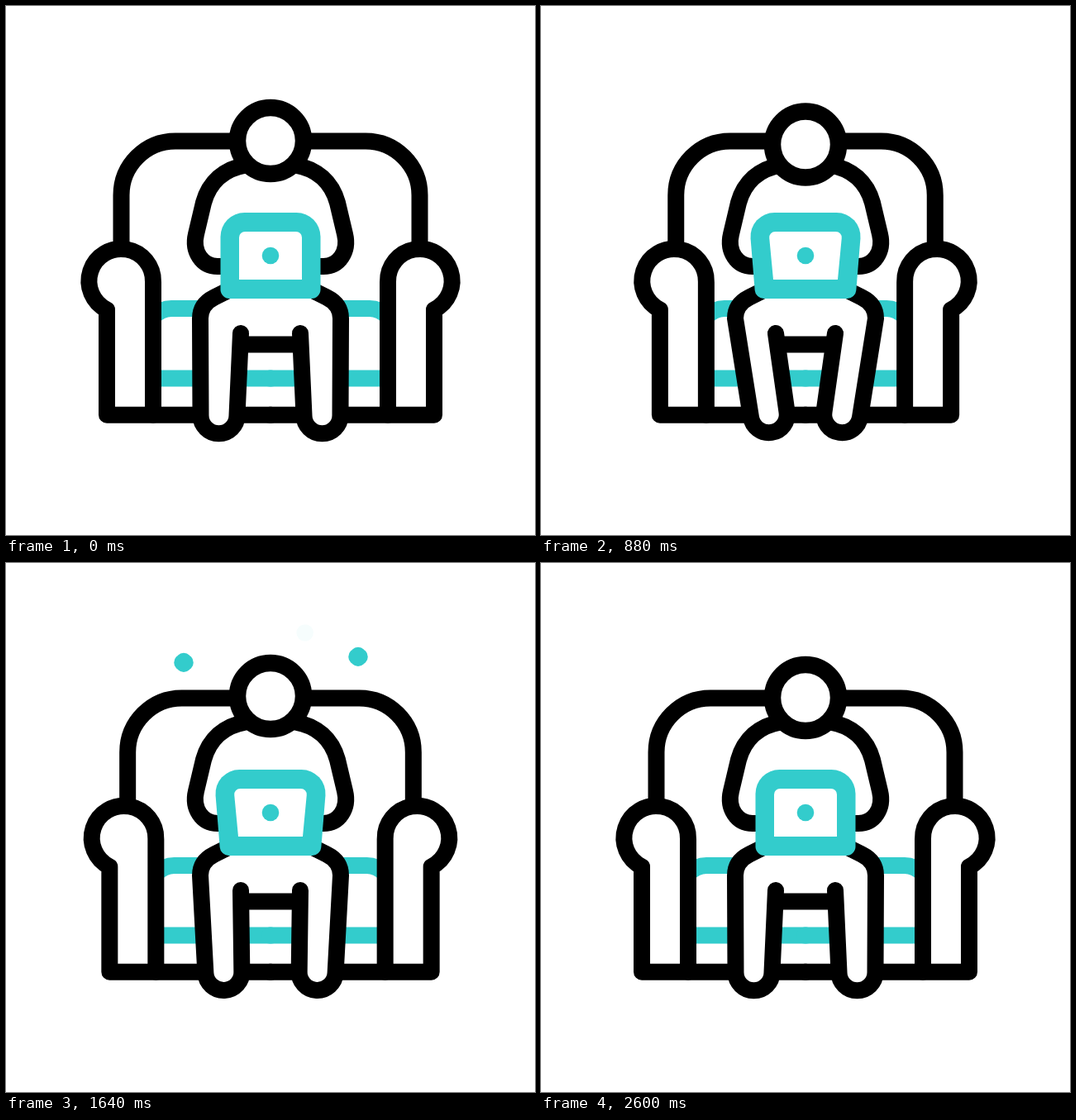
Recreate the animation shown at these times as an HTML page with a canvas. Size 640 px wide and 640 px high, loop 3000 ms.

```html
<!DOCTYPE html>
<html lang="en">
<head>
<meta charset="utf-8">
<title>Working on the sofa</title>
<style>
html, body { margin: 0; width: 100%; height: 100%; overflow: hidden; background: #fff; }
canvas { display: block; width: 100vmin; height: 100vmin; }
</style>
</head>
<body>
<canvas id="stage" width="640" height="640"></canvas>
<script>
const ctx = document.getElementById('stage').getContext('2d');
const BLACK = '#000', TEAL = '#33cccc', WHITE = '#fff';
const LOOP = 3000, STEP = 40, LAST = 2600;

// Eased 0 to 1 between two times.
function ramp(t, from, to) {
  const p = Math.min(1, Math.max(0, (t - from) / (to - from)));
  return p * p * (3 - 2 * p);
}

// Eased rise, hold and fall.
const pulse = (t, rise, top, fall, end) => ramp(t, rise, top) - ramp(t, fall, end);

function draw(d, { stroke, fill, width = 20 }) {
  const path = new Path2D(d);
  if (fill) { ctx.fillStyle = fill; ctx.fill(path); }
  if (stroke) { ctx.strokeStyle = stroke; ctx.lineWidth = width; ctx.stroke(path); }
}

function disc(x, y, r, color, alpha = 1) {
  ctx.globalAlpha = alpha;
  ctx.fillStyle = color;
  ctx.beginPath();
  ctx.arc(x, y, r, 0, Math.PI * 2);
  ctx.fill();
  ctx.globalAlpha = 1;
}

// Symmetric four-sided panel with rounded corners.
function panel(topX, topY, topR, bottomX, bottomY, bottomR, color) {
  ctx.beginPath();
  ctx.moveTo(320, topY);
  ctx.arcTo(640 - topX, topY, 640 - bottomX, bottomY, topR);
  ctx.arcTo(640 - bottomX, bottomY, bottomX, bottomY, bottomR);
  ctx.arcTo(bottomX, bottomY, topX, topY, bottomR);
  ctx.arcTo(topX, topY, 320, topY, topR);
  ctx.closePath();
  ctx.fillStyle = color;
  ctx.fill();
}

function bothSides(paint) {
  paint();
  ctx.save();
  ctx.translate(640, 0);
  ctx.scale(-1, 1);
  paint();
  ctx.restore();
}

function drawSofa(widen, squeeze) {
  const back = 139.5 - 6.5 * widen + 42.5 * squeeze;
  const arm = 122 - 13 * widen + 49 * squeeze;
  const inner = arm + 56;
  bothSides(() => {
    draw(`M${back} 300V229a65.5 65.5 0 0 1 65.5 -65.5H321`, { stroke: BLACK });
    draw(`M${inner} 376c6 -6 13 -10 22 -10H321M${inner} 450.5H321`, { stroke: TEAL });
    draw(`M${inner} 494.7H321`, { stroke: BLACK });
    draw(`M${arm} 367.5A38.8 38.8 0 1 1 ${inner} 334V494.7H${arm}Z`,
      { stroke: BLACK, fill: WHITE });
  });
}

function drawPerson(headY, shift) {
  const tilt = shift / 120, r = 22;
  const footX = 257.5 + shift, footY = 495.3 - shift * 0.06;
  const dx = r * Math.cos(tilt), dy = r * Math.sin(tilt);
  draw('M284 409.5H356', { stroke: BLACK });
  bothSides(() => {
    draw('M290 192.5C264 197 246 213 239 238L230 276C225 297 237 315 256 315H270',
      { stroke: BLACK });
    const leg = `M266 345.5L252 352.5Q235 361 235 378L${footX - dx} ${footY + dy}` +
      `A${r} ${r} 0 0 0 ${footX + dx} ${footY - dy}L284 396`;
    draw(leg + 'H321V345Z', { fill: WHITE });
    draw(leg, { stroke: BLACK });
  });
  draw(`M280 ${headY}a40 40 0 1 1 80 0a40 40 0 1 1 -80 0Z`,
    { stroke: BLACK, fill: WHITE, width: 20.5 });
}

function drawLaptop(open) {
  panel(259.5 - 8.5 * open, 250, 29, 259.5, 354, 11, TEAL);
  panel(282 - 6.5 * open, 273, 7, 282 - open, 331, 0, WHITE);
  disc(320, 302, 10.3, TEAL);
}

function drawSpark(x, base, wide, tall) {
  if (wide <= 0) return;
  const height = 51 * tall, half = 17 * wide, mid = base - height / 2;
  draw(`M${x} ${base}V${base - height - 0.01}M${x - half} ${mid}H${x + half}`, { stroke: TEAL });
}

function render(t) {
  const widen = pulse(t, 0, 480, 1880, 2600);
  const squeeze = pulse(t, 480, 1100, 1260, 1880);
  const lift = pulse(t, 0, 600, 1720, 2160);
  const nod = pulse(t, 600, 1090, 1090, 1720);
  const step = pulse(Math.max(0, t - 200) % 1200, 0, 640, 640, 1200);
  const wide = pulse(t, 960, 1230, 1480, 1680);
  const tall = pulse(t, 960, 1390, 1420, 1680);

  ctx.fillStyle = WHITE;
  ctx.fillRect(0, 0, 640, 640);
  ctx.lineCap = ctx.lineJoin = 'round';
  drawSofa(widen, squeeze);
  drawPerson(163 - 2.6 * lift + 11.6 * nod, 18.5 * step);
  drawLaptop(widen);
  drawSpark(215, 122, wide, tall);
  drawSpark(426, 115, wide, tall);
  disc(284.5, 64, 10.3, TEAL, pulse(t, 960, 1140, 1200, 1360));
  disc(361.7, 84.5, 10.3, TEAL, pulse(t, 1200, 1360, 1500, 1660));
}

const start = performance.now();
function tick() {
  const t = (performance.now() - start) % LOOP;
  render(Math.min(LAST, Math.floor((t + 3) / STEP) * STEP));
  requestAnimationFrame(tick);
}
tick();
</script>
</body>
</html>
```
